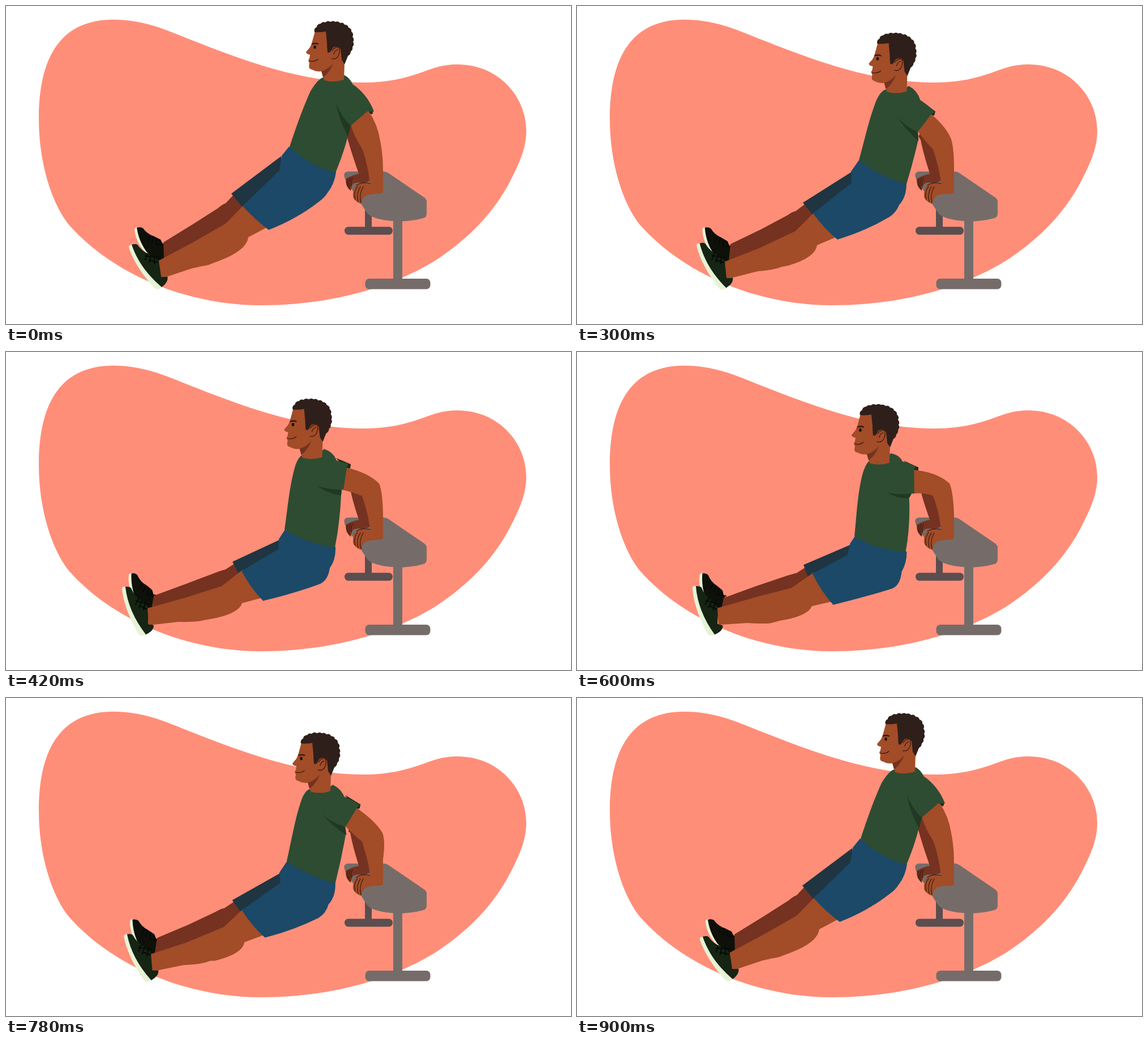
Recreate the animation shown at these times as an HTML page. Size 998x561 px, loop 930 ms.

```html
<!DOCTYPE html>
<html lang="en">
<head>
<meta charset="utf-8">
<title>Bench dip</title>
<style>
html, body { margin: 0; width: 100%; height: 100%; overflow: hidden; background: #fff; }
svg { display: block; width: 100vw; height: 100vh; }
.skin { fill: #a24c28; }
.shade { fill: #753220; }
.hair { fill: #2f1f1a; }
.shirt { fill: #2e4c32; }
.fold { fill: #213822; }
.shorts { fill: #1b4967; }
.shorts2 { fill: #1f3541; }
.sole { fill: #e6f3d6; }
.metal { fill: #756c69; }
.metal2 { fill: #5a4e4f; }
.line { fill: none; stroke: #35180f; stroke-width: 1.2; stroke-linecap: round; stroke-linejoin: round; }
.lace { fill: none; stroke: #070906; stroke-width: 2; stroke-linecap: round; }
</style>
</head>
<body>
<svg viewBox="0 0 998 561" preserveAspectRatio="none">
  <path fill="#ff8e79" d="M58 200C58 85 100 24 190 24C232 24 268 36 300 49C380 81 450 108 520 122.5C555 130 590 135 632 135C672 135 706 128 740 115C760 107 778 103 797 103C870 103 919 160 919 220C919 250 908 275 890 310C860 367 817 410 760 448C680 498 570 528 450 528C320 528 190 474 112 387C80 348 58 275 58 200Z"/>

  <path class="metal2" d="M634 355H646V395H634Z"/>
  <rect class="metal2" x="598" y="389.5" width="85" height="14" rx="6.5"/>
  <path class="metal" d="M684 370H700V485H684Z"/>
  <rect class="metal" x="634.5" y="481" width="115" height="18.5" rx="7"/>
  <path class="metal" d="M604 292H667Q672 292 676 295L739 338Q743 341 743 345V366Q743 372 738 374Q716 380 690 380Q645 377 637 364L599 305Q594 293 604 292Z"/>

  <path id="armFar" class="shade"/>
  <path class="shade" d="M624 296L640 293L644 307Q636 313 628 312Q614 310 611 317L609 326Q599 318 600 305Q611 298 624 296Z"/>
  <path class="line" d="M604 305Q601 312 604 319M608 303Q604 313 607 323M612 303Q608 310 610 317"/>

  <g id="shoeFar">
    <path class="sole" d="M227 395Q227 391 232 390L240 412L260 443L251 440Q230 420 227 395Z"/>
    <path fill="#0e100a" d="M231 391Q238 389 242 392Q249 402 261 406L273 412L279 424L279 446L268 453Q237 430 231 391Z"/>
    <path class="lace" d="M254 405L251 414M260 407L258 418M266 410L266 421L281 420M270 413L279 423"/>
  </g>
  <path id="legFar" class="shade"/>
  <path id="shortsFar" class="shorts2"/>

  <g id="shoeNear">
    <path class="sole" d="M217 426Q216 421 223 421L240 454L276 496L268 500Q263 500 257 492Q227 457 217 426Z"/>
    <path fill="#152413" d="M222 421Q229 419 232 421Q242 435 258 440L270 449L275 476L285 477Q288 486 275 496Q236 463 222 421Z"/>
    <path class="lace" d="M249 437L246 448M256 439L253 452M262 440L262 454M246 441L269 443M255 449L268 452"/>
  </g>
  <path id="legNear" class="skin"/>
  <path id="shortsNear" class="shorts"/>

  <path id="lining" fill="#1a2a1a"/>
  <path id="arm" class="skin"/>
  <path class="skin" d="M666 310V326Q666 331 660 331L646 332Q633 333 630 341L627 349Q616 345 613 337Q612 324 618 316Q626 310 643 313Z"/>
  <path class="line" d="M621 318Q613 329 617 341M626 319Q618 331 622 345M631 319Q623 332 627 347M619 316Q629 310 643 313"/>

  <path id="torso" class="shirt"/>
  <path id="sleeve" class="shirt"/>
  <path id="fold" class="fold"/>

  <g id="head">
    <path class="skin" d="M546 44L541 62Q539 70 536 74L530 81Q530 85 537 86L536 92L534 96L536 101Q533 111 540 112Q549 117 558 115L562 131Q580 136 597 130L598 98L592 60L566 42Z"/>
    <path class="shade" d="M557 115Q569 112 578 101Q572 117 560 126Z"/>
    <path class="hair" d="M545 46q-2-6 4-9q0-5 7-6q3-4 8-2q4-4 9-1q5-3 9 0q5-2 8 2q6-2 8 3q6 0 7 5q6 2 5 7q5 4 2 9q4 5 1 9q3 5-1 9q1 5-3 8q0 5-5 8L598 103L593 95L591 76Q585 70 578 73L572 82H568Q567 74 567 66Q566 55 565 45Q555 47 545 46Z"/>
    <path class="skin" d="M574 80Q579 71 588 72Q592 78 588 87Q583 95 575 93Z"/>
    <path class="line" d="M576 79Q580 72 588 73Q591 79 587 88Q583 95 575 93M586 77Q580 79 579 85"/>
    <ellipse cx="545.5" cy="72.5" rx="2.2" ry="3" fill="#150c0a"/>
    <path class="line" d="M541 67Q546 65 551 67" style="stroke-width:2.4"/>
    <path class="line" d="M536 97Q545 99 551 94"/>
  </g>
</svg>
<script>
const LOOP = 930, STEP = 30;
const $ = id => document.getElementById(id);

// Each shape at depth 0, 20 and 55.
const body = {
  legFar: [
    "M402 333L388 348Q382 350 374 357L330 385L278 417L279 447L310 440L395 390L420 352Z",
    "M406 347L386 362Q380 363 372 369L325 394L271 420L268 450L310 440L395 400L420 366Z",
    "M409 370L387 384Q381 385 371 389L318 409L261 430L257 453L310 442L392 415L418 386Z"],
  shortsFar: [
    "M486 265L398 331L417 354L486 291Z",
    "M486 292L399 347L416 368L487 312Z",
    "M486 330L400 370L411 392L483 348Z"],
  legNear: [
    "M420 351L388 384L330 417L270 449L274 478L283 478L328 463Q345 459 357 457L378 449Q425 431 428 408L460 391L440 365Z",
    "M419 364L386 397L320 428L261 451L264 480L272 480L319 468Q347 466 362 460L373 458Q421 444 424 422L457 408L440 378Z",
    "M418 384L381 413L318 433L250 452L252 481L261 481L305 476Q335 477 350 473L362 471Q411 462 417 443L451 434L435 398Z"],
  shortsNear: [
    "M500 248L487 264L483 290L418 353Q440 377 464 395Q515 375 553 345Q563 338 569 328Q580 314 583 293L540 268Z",
    "M498 272L484 292L485 312L417 366Q436 392 460 412Q510 397 552 372Q564 364 569 351Q582 337 582 313L540 288Z",
    "M493 313L482 330L481 348L416 386Q431 415 454 439Q512 425 555 409Q569 402 572 381Q583 366 582 344L540 328Z"],
  torso: [
    "M560 126C550 130 544 141 538 150C525 178 512 215 501 248Q535 281 582 294Q597 258 604 229L609 211L612 137Q607 127 598 122Q580 135 560 126Z",
    "M546 147C538 149 533 158 529 166C517 195 507 240 498 272Q535 301 582 314Q594 275 603 235L602 222L606 165Q601 149 586 141Q570 154 546 147Z",
    "M524 181C517 185 513 194 510 204C500 240 497 280 492 313Q527 337 581 345Q590 300 592 251L593 243L583 189Q577 176 562 171Q545 188 524 181Z"]
};
const limb = {
  armFar: [
    "M598 214L614 208L634 248L646 297L624 298Q611 262 603 233Z",
    "M603 230L606 225L634 250L646 297L624 298Q612 262 607 236Z",
    "M608 244L615 246L634 255L646 297L624 298Q613 266 609 246Z"],
  lining: [
    "M617 148L649 184L647 191L640 189Z",
    "M605 165L633 186L631 193L622 194Z",
    "M583 187L609 198L608 205L600 205Z"],
  arm: [
    "M600 200L640 184Q657 210 661 238Q666 262 666 290L666 326L643 313L640 293Q634 262 628 250Q616 232 609 210Z",
    "M594 212L626 191Q652 213 661 235Q666 252 666 285L666 326L643 313L640 293Q636 275 629 253Q616 240 602 221Z",
    "M586 225L602 204Q640 213 659 232Q665 245 666 285L666 326L643 313L640 293Q636 275 629 254Q612 247 594 243Z"],
  sleeve: [
    "M609 211L638 186L650 186Q638 155 611 137L583 160L583 180Z",
    "M602 222L625 192L632 187Q620 174 604 165L566 180L566 198Z",
    "M596 243L602 204L605 197Q593 194 580 190L550 215L550 236Z"],
  fold: [
    "M583 172Q594 198 609 211L604 230Q588 200 583 172Z",
    "M565 195Q578 212 602 222L603 238Q580 218 565 195Z",
    "M550 236Q568 243 593 243L592 253Q568 250 550 236Z"]
};

// Motion tables: time in ms, value.
const depth = [[0, 0], [210, 0], [235, 2], [300, 20], [420, 55], [452, 63], [480, 65], [640, 65], [670, 63], [720, 51], [840, 16], [900, 0], [930, 0]];
const armDepth = [[0, 0], [210, 0], [235, 2], [300, 20], [420, 55], [452, 63], [480, 65], [640, 65], [670, 61], [720, 47], [840, 11], [900, 0], [930, 0]];
const elbow = [[0, 0], [640, 0], [720, 4], [840, 5], [900, 0], [930, 0]];

function at(table, t) {
  const i = table.findIndex(k => k[0] > t);
  const [t0, a] = table[i - 1], [t1, b] = table[i];
  return a + (b - a) * (t - t0) / (t1 - t0);
}

// Quadratic through the values at depths 0, 20 and 55.
const blend = (a, b, c, d) =>
  a * (d - 20) * (d - 55) / 1100 - b * d * (d - 55) / 700 + c * d * (d - 20) / 1925;

const number = /\d+/g;
const prepare = set => Object.entries(set).map(([id, poses]) => ({
  id, node: $(id), text: poses[0], poses: poses.map(p => p.match(number).map(Number))
}));
const bodyParts = prepare(body), limbParts = prepare(limb);

function shape(part, d, bulge) {
  const [a, b, c] = part.poses;
  let i = 0;
  part.node.setAttribute("d", part.text.replace(number, () => {
    const push = part.id === "arm" && i > 3 && i < 10 ? bulge : 0;
    const v = blend(a[i], b[i], c[i], d) + push;
    i++;
    return v.toFixed(2);
  }));
}

function shoe(id, x, y, xs, ys, d) {
  const dx = blend(0, ...xs, d), dy = blend(0, ...ys, d), turn = blend(0, 4.5, 12, d);
  $(id).setAttribute("transform", `translate(${dx} ${dy}) rotate(${turn} ${x} ${y})`);
}

function draw(t) {
  const d = at(depth, t), da = at(armDepth, t), bulge = at(elbow, t);
  bodyParts.forEach(p => shape(p, d, 0));
  limbParts.forEach(p => shape(p, da, bulge));
  shoe("shoeNear", 217, 423, [-5.5, -11.5], [-3, -8], d);
  shoe("shoeFar", 227, 394, [-5.5, -10], [-0.5, -1.5], d);
  $("head").setAttribute("transform", `translate(${blend(0, -14.5, -38.5, d)} ${blend(0, 20.5, 55.5, d)})`);
}

const start = performance.now();
function tick() {
  const t = (performance.now() - start) % LOOP;
  draw(Math.floor(t / STEP) * STEP);
  requestAnimationFrame(tick);
}
tick();
</script>
</body>
</html>
```
